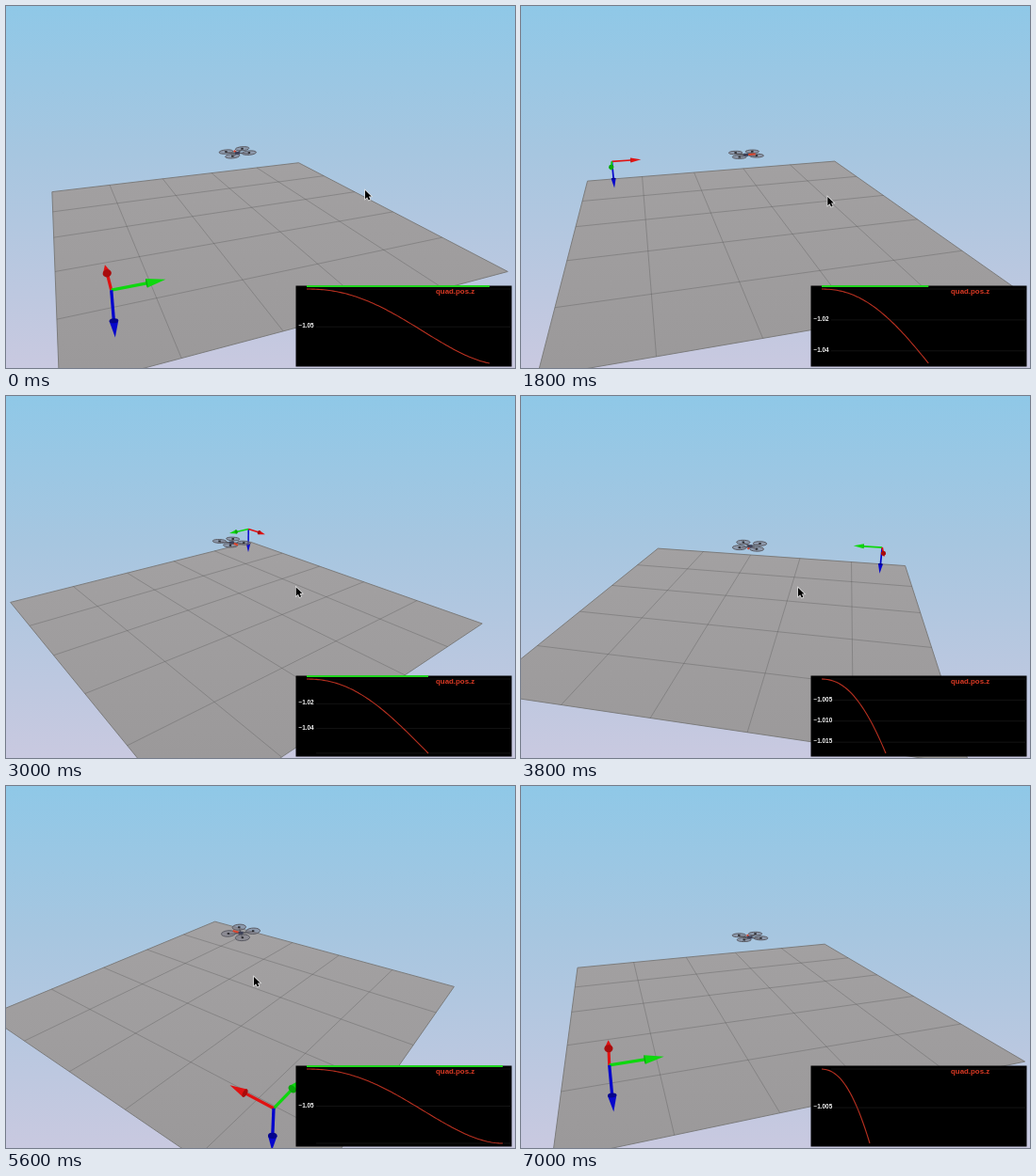
An HTML page with a canvas for the animation above (7.2 s loop, 540 by 385 pixels).

```html
<!DOCTYPE html>
<html lang="en">
<head>
<meta charset="utf-8">
<title>Quadcopter simulation</title>
<style>
html, body { margin: 0; width: 100%; height: 100%; overflow: hidden; background: #a9c6e0; }
canvas { display: block; }
</style>
</head>
<body>
<canvas id="stage" width="540" height="385"></canvas>
<script>
const ctx = document.getElementById('stage').getContext('2d');
const STEP = 200, STEPS = 36, RAD = Math.PI / 180;
const CX = 242.5, CY = 160, FOCAL = 482, DIST = 6.47, PIVOT = 1.04;
const PLOT_CYCLE = 217, PLOT_X = 319;

// step, yaw, pitch, plot progress, pointer x, pointer y
const KEYS = [
  [0, 21.8, 15.43, 194, 381, 196],
  [5, -40.3, 16.4, 393, 335, 203],
  [12, -102.5, 17.6, 663, 318, 203],
  [19, -191.8, 18.6, 936, 294, 204],
  [24, -245, 20.6, 1136, 281, 204],
  [28, -307.9, 21.72, 1293, 263, 203],
  [35, -342.2, 15.43, 1570, 240, 203]
];

function pose(step) {
  let k = 0;
  while (k < KEYS.length - 2 && step >= KEYS[k + 1][0]) k++;
  const a = KEYS[k], b = KEYS[k + 1], f = (step - a[0]) / (b[0] - a[0]);
  return a.map((v, i) => v + (b[i] - v) * f);
}

// Returns a projector: ground coordinates a, b and height h to screen x, y, depth.
function camera(yaw, pitch) {
  const sy = Math.sin(yaw), cy = Math.cos(yaw), sp = Math.sin(pitch), cp = Math.cos(pitch);
  return (a, b, h) => {
    const x = b * cy - a * sy, z = a * cy + b * sy, up = h - PIVOT;
    const depth = DIST + z * cp - up * sp;
    return [CX + FOCAL * x / depth, CY - FOCAL * (up * cp + z * sp) / depth, depth];
  };
}

function path(points, close) {
  ctx.beginPath();
  points.forEach(p => ctx.lineTo(p[0], p[1]));
  if (close) ctx.closePath();
}

function line(points, color, width) {
  path(points);
  ctx.strokeStyle = color;
  ctx.lineWidth = width;
  ctx.stroke();
}

function drawSky() {
  const sky = ctx.createLinearGradient(0, 0, 0, 385);
  sky.addColorStop(0, '#8fc8e7');
  sky.addColorStop(0.4, '#a6c6e0');
  sky.addColorStop(1, '#c9c9e0');
  ctx.fillStyle = sky;
  ctx.fillRect(0, 0, 540, 385);
}

function drawGround(project) {
  const e = 2.5;
  const outline = [[-e, -e], [e, -e], [e, e], [-e, e]].map(([a, b]) => project(a, b, 0));
  const shade = ctx.createLinearGradient(0, 150, 0, 385);
  shade.addColorStop(0, '#a3a1a2');
  shade.addColorStop(1, '#9b999a');
  path(outline, true);
  ctx.fillStyle = shade;
  ctx.fill();
  ctx.strokeStyle = '#7c7c7c';
  ctx.lineWidth = 1;
  ctx.stroke();
  for (let v = -1.5; v < 2; v++) {
    line([project(v, -e, 0), project(v, e, 0)], 'rgba(80,80,80,.36)', 0.9);
    line([project(-e, v, 0), project(e, v, 0)], 'rgba(80,80,80,.36)', 0.9);
  }
}

function drawAxes(project) {
  const axes = [[1, 0, 0, '#e01212', '#a80c0c'], [0, 1, 0, '#0ed80e', '#0aa80a'], [0, 0, -1, '#0606cc', '#04048c']];
  const arrows = axes.map(([a, b, h, color, dark]) => {
    const at = s => project(-2 + a * s, -2 + b * s, 0.5 + h * s);
    return { from: at(0), neck: at(0.32), tip: at(0.5), color, dark };
  });
  arrows.sort((p, q) => q.tip[2] - p.tip[2]);
  for (const { from, neck, tip, color, dark } of arrows) {
    const scale = FOCAL / neck[2], r = 0.042 * scale;
    const dx = tip[0] - neck[0], dy = tip[1] - neck[1], len = Math.hypot(dx, dy);
    const ratio = Math.sqrt(Math.max(0.02, 1 - (len / (0.18 * scale)) ** 2));
    const nx = -dy / len * r, ny = dx / len * r;
    line([from, neck], color, 0.029 * scale);
    path([[neck[0] + nx, neck[1] + ny], tip, [neck[0] - nx, neck[1] - ny]], true);
    ctx.fillStyle = color;
    ctx.fill();
    ctx.beginPath();
    ctx.ellipse(neck[0], neck[1], r * ratio, r, Math.atan2(dy, dx), 0, 7);
    ctx.fillStyle = dark;
    ctx.fill();
  }
}

function drawDrone(project, rise) {
  const at = (a, b, h = 0) => project(a - 1.1 * rise, b, 1.02 + rise + b * 0.9 * rise + h);
  const rotors = [45, 135, 225, 315].map(d => [Math.cos(d * RAD) * 0.175, Math.sin(d * RAD) * 0.175]);
  for (const [a, b] of rotors) line([at(0, 0), at(a, b)], '#55555c', 1.4);
  rotors.sort((p, q) => at(...q)[2] - at(...p)[2]);
  for (const [a, b] of rotors) {
    const rim = [];
    for (let d = 0; d < 360; d += 20) rim.push(at(a + 0.098 * Math.cos(d * RAD), b + 0.098 * Math.sin(d * RAD), 0.01));
    path(rim, true);
    ctx.fillStyle = 'rgba(125,125,138,.6)';
    ctx.fill();
    ctx.strokeStyle = '#5a5a62';
    ctx.lineWidth = 1;
    ctx.stroke();
    const hub = at(a, b, 0.01);
    ctx.fillStyle = '#2a2a2e';
    ctx.fillRect(hub[0] - 1.2, hub[1] - 0.9, 2.4, 1.8);
  }
  line([at(0.03, 0), at(0.14, 0)], '#d8452e', 2);
  const body = at(0, 0);
  ctx.fillStyle = '#3c4058';
  ctx.fillRect(body[0] - 2.5, body[1] - 1.5, 5, 3);
}

function drawPointer(x, y) {
  const shape = [[0, 0], [0, 11.5], [2.7, 9], [4.7, 13.2], [6.7, 12.3], [4.8, 8.2], [8.3, 8]];
  path(shape.map(p => [x + 0.8 * p[0], y + 0.8 * p[1]]), true);
  ctx.strokeStyle = '#e4e4e4';
  ctx.lineWidth = 1.4;
  ctx.stroke();
  ctx.fillStyle = '#000';
  ctx.fill();
}

// Climb of the drone along one plot cycle, 0 to 0.1
function climb(u) {
  const x = Math.min(1, (u + 2) / 210) ** 1.2;
  return 0.1 * x * x * (3 - 2 * x);
}

function tickStep(range) {
  const rough = range / 4.7, base = 10 ** Math.floor(Math.log10(rough));
  return base * [1, 2, 5, 10].find(m => m * base >= rough);
}

function drawPlot(u) {
  const end = climb(u), range = Math.max(end, 0.001);
  const toY = z => 340.5 + (z - end / 2) * 79 / range;
  ctx.fillStyle = '#000';
  ctx.fillRect(307.5, 297.5, 229, 86);

  const step = tickStep(range), digits = Math.ceil(-Math.log10(step));
  ctx.font = 'bold 6.4px "Liberation Sans", Arial, sans-serif';
  for (let k = 0; k < 6; k++) {
    const y = toY(k * step);
    if (y > 381) break;
    line([[329, y], [535, y]], '#131313', 1);
    if (y < 305 || y > 378) continue;
    ctx.fillStyle = '#f4f4f4';
    ctx.fillText('\u2212' + (1 + k * step).toFixed(digits), 310.5, y + 1.2);
  }

  const curve = [];
  for (let x = 0; x < u; x += 2) curve.push([PLOT_X + x, toY(climb(x))]);
  curve.push([PLOT_X + u, toY(end)]);
  line(curve, '#b83020', 1.1);
  if (u > 100) line([[PLOT_X, 298], [PLOT_X + u, 298]], '#1fd41f', 2);

  ctx.font = 'bold 7.9px "Liberation Sans", Arial, sans-serif';
  ctx.fillStyle = '#dc3a24';
  ctx.fillText('quad.pos.z', 456, 306.2);
}

function draw(now) {
  const step = Math.floor(now / STEP) % STEPS;
  const [, yaw, pitch, progress, px, py] = pose(step);
  const u = progress % PLOT_CYCLE;
  const project = camera(yaw * RAD, pitch * RAD);
  drawSky();
  drawGround(project);
  drawAxes(project);
  drawDrone(project, climb(u));
  if (step < 32) drawPointer(px, py);
  drawPlot(u);
}

const start = performance.now();
function tick() {
  draw(performance.now() - start);
  requestAnimationFrame(tick);
}
tick();
</script>
</body>
</html>
```
